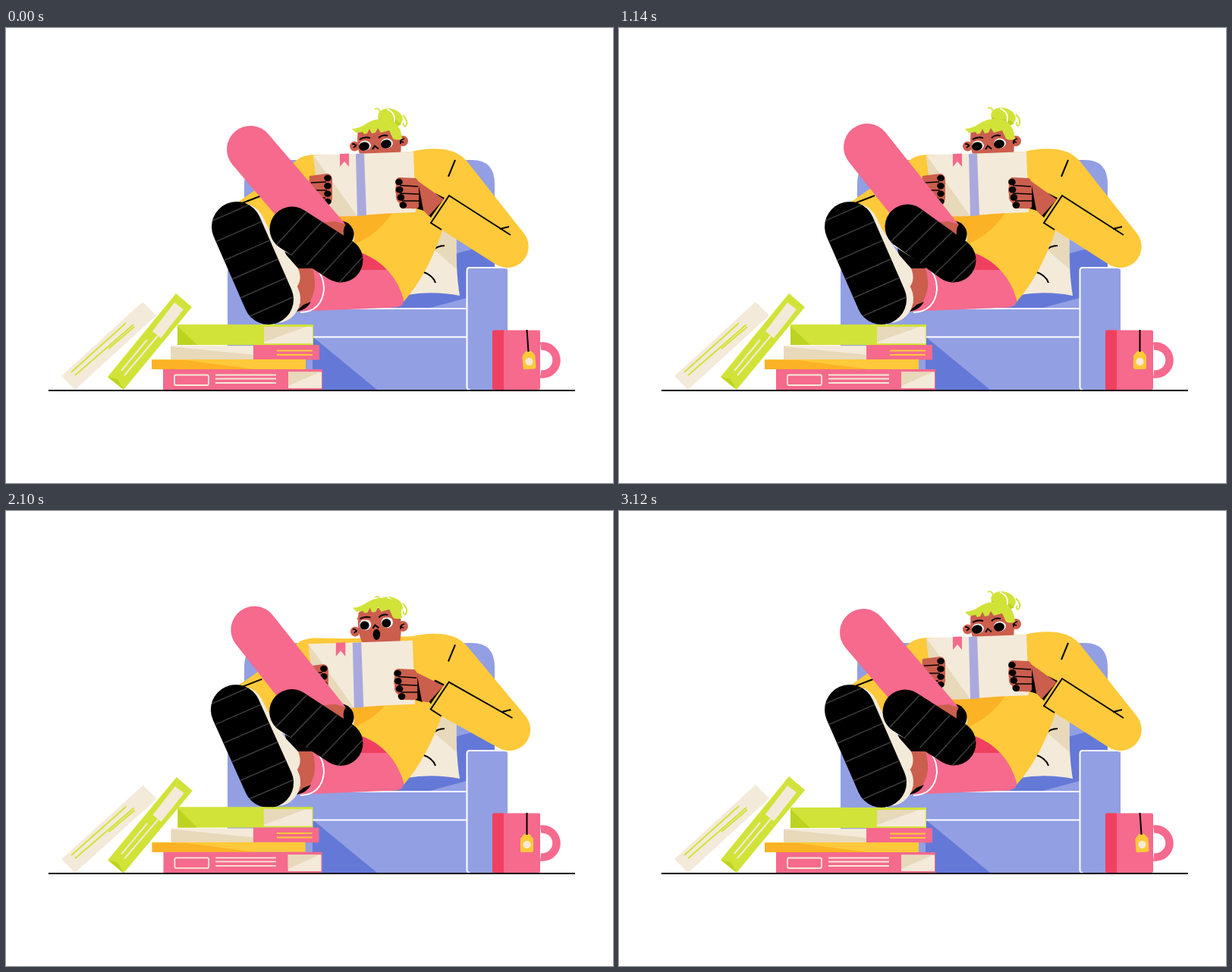
These frames come from a looping animation (800x600 px, 3.15 s). An HTML page with a canvas:

```html
<!DOCTYPE html>
<html lang="en">
<head>
<meta charset="utf-8">
<title>Reading in the armchair</title>
<style>
html, body { margin: 0; width: 100%; height: 100%; overflow: hidden; background: #fff; }
canvas { display: block; }
</style>
</head>
<body>
<canvas id="stage" width="800" height="600"></canvas>
<script>
const c = document.getElementById('stage').getContext('2d');
const LOOP = 3150;
const blue = '#929fe3', navy = '#6479d7', cream = '#f4ead9', sand = '#e8d9bb', pink = '#f56a8d', red = '#f0405f',
  yellow = '#fec93a', orange = '#fcb225', lime = '#d1e339', moss = '#bcd41f', skin = '#cb5e4d', black = '#000', white = '#fff';

function ramp(t, a, b) {
  const u = Math.min(1, Math.max(0, (t - a) / (b - a)));
  return u * u * (3 - 2 * u);
}
const pulse = (t, a, b) => t > a && t < b ? Math.sin(Math.PI * (t - a) / (b - a)) : 0;

// Five moods drive the whole pose: settling in, legs up, frowning, landing, astonishment.
function poseAt(t) {
  const up = ramp(t, 1140, 1620), down = ramp(t, 1620, 1890), calm = ramp(t, 1890, 2160), back = ramp(t, 2700, 3120);
  const lean = ramp(t, 0, 450) - back, kick = up - .75 * down - .25 * calm, frown = up - .25 * down - .75 * calm,
    thud = down - calm, gasp = calm - back;
  return {
    kick, frown, thud, gasp,
    kneeX: 322 + 5 * lean + 11 * kick, kneeY: 160 - 3 * lean - 13 * kick,
    toeX: 304 + 12 * kick + 2 * thud - 2 * gasp, toeY: 262 - 18 * kick + 5 * thud,
    heelX: 346 + frown, heelY: 358 - 11 * kick + 5 * thud,
    tipX: 377 + 3 * lean + 6 * frown + 4 * thud - 5 * gasp, tipY: 265 - 3 * lean - 15 * kick - 4 * thud + 4 * gasp,
    endY: 306 - 4 * kick + 4 * thud,
    bun: 9 * gasp - lean - 3 * kick,
    bookX: 537 - 3 * frown - gasp, bookY: 163 + 5 * thud + 8 * gasp,
    rightX: kick - thud - 2 * gasp, rightY: 5 * thud - 4 * kick + 12 * gasp,
    leftX: 8 * kick - thud - 6 * gasp, leftY: 4 * thud - 5 * kick + 11 * gasp,
    cuffX: -4 * kick - thud, cuffY: 2 * thud - 4 * kick + 5 * gasp,
    elbow: 3 * gasp - 5 * kick, shoulder: 3 * gasp - 3 * frown,
    armX: 18 * kick, armY: gasp - 5 * kick - thud,
    tag: 4 * (lean - 1)
  };
}

function fill(color, d) {
  c.fillStyle = color;
  c.fill(new Path2D(d));
}
function line(color, width, d) {
  c.strokeStyle = color;
  c.lineWidth = width;
  c.stroke(new Path2D(d));
}
function oval(color, x, y, rx, ry = rx, turn = 0) {
  c.fillStyle = color;
  c.beginPath();
  c.ellipse(x, y, rx, ry, turn, 0, 7);
  c.fill();
}
function group(x, y, draw) {
  c.save();
  c.translate(x, y);
  draw();
  c.restore();
}
// Scale and turn around a fixed point.
function around(x, y, sx, sy, deg, draw) {
  group(x, y, () => {
    c.rotate(deg * Math.PI / 180);
    c.scale(sx, sy);
    c.translate(-x, -y);
    draw();
  });
}
function capsule(color, x1, y1, x2, y2, r) {
  const a = Math.atan2(y2 - y1, x2 - x1), q = Math.PI / 2;
  c.fillStyle = color;
  c.beginPath();
  c.arc(x1, y1, r, a + q, a - q);
  c.arc(x2, y2, r, a - q, a + q);
  c.closePath();
  c.fill();
  return a;
}
function sole(x1, y1, x2, y2, r, first, gap, skew) {
  c.save();
  const a = capsule(black, x1, y1, x2, y2, r);
  c.clip();
  c.translate(x1, y1);
  c.rotate(a);
  for (let x = first; x < 150; x += gap) line('#3a3a3a', 1.6, `M${x - skew} 45L${x + skew} -45`);
  c.restore();
}

function sofa() {
  fill(blue, 'M314 320V206Q314 174 344 174H614Q644 174 644 206V320z');
  fill(blue, 'M296 317H610V477H292V321q0-4 4-4z');
  fill(navy, 'M510 320L617 291L644 300V318H607V356L555 370H500z');
  fill(navy, 'M404 407L489 477H404z');
  line(white, 2, 'M352.500 394V374q0-4 4-4H607M403 407.500H607');
  fill(cream, 'M528 352Q562 346 598 353Q592 318 594 262H555z');
  fill(sand, 'M572 266L593.500 266V318L564 292z');
  line(black, 2, 'M562 294Q568 287 578 287M548 321Q563 326 566 336');
  fill(blue, 'M607 477V320q0-4 4-4H657q4 0 4 4V477z');
  line(white, 2, 'M660 317Q659 316 657 316H611q-3.500 0-3.500 4V473q0 4 4 4');
}

function body(p) {
  const s = p.shoulder, x = p.armX, y = p.armY;
  fill(yellow, `M${298 + x} 250V${235 + y}L${325 + x} ${216 + y}L${376 + x} ${181 + y}Q${387 + x} ${167 + y} ${407 + x} ${167 + y}
    L450 ${167 + s / 2}L535 ${163 + s}Q575 ${153 + s} 601 ${170 + s}L596 240L577 262Q556 325 524 361L470 298L420 300z`);
  line(black, 2, `M${311 + x * 1.5} ${231 + y}L${337 + x} ${221 + y}`);
  fill(orange, 'M430 230L516 232Q495 272 456 286z');
}

function sleeve(p) {
  const s = p.shoulder, e = p.elbow, x = p.cuffX, y = p.cuffY;
  const cuff = `${574 + x} ${266 + y}L${560 + x} ${257 + y}L${584 + x} ${221 + y}`;
  fill(yellow, `M560 ${160 + s}Q590 ${157 + s} 607 ${175 + s}L${682 + e} 270A28 28 0 0 1 ${646 + e} 312L${cuff}z`);
  fill(black, `M${578 + x} ${224 + y}L${560 + x} ${250 + y}L${550 + x} 240L${566 + x} ${218 + y}z`);
  group(p.rightX, p.rightY, () => fill(black, 'M541 202L552 210L551 241L541 238z'));
  fill(skin, `M${543 + p.rightX} ${202 + p.rightY}L${577 + x} ${226 + y}L${557 + x} ${248 + y}L${550 + p.rightX} ${240 + p.rightY}z`);
  line(black, 2, `M${cuff}L${665 + e} 273M${651 + e} 265L${663 + e} 262M592 ${174 + s}L583 ${196 + s}`);
}

// side is 1 for the left eye, -1 for the right.
function eye(x, y, side, p) {
  oval(white, x + 1, y - 1, 7.8, 6.5 + p.gasp);
  oval(black, x, y, 7 - p.gasp, 5.6, -.15);
  const lid = y - 8 + 3 * p.frown;
  if (p.frown > .02) fill(skin, `M${x - 10 * side} ${y - 10}V${lid}L${x + 10 * side} ${lid + 9 * p.frown}V${y - 10}z`);
}

function head(p) {
  const ears = 4 * p.frown + 3 * p.gasp;
  around(523, 150, 1 + .16 * p.frown - .03 * p.gasp, 1, 0, () => {
    group(0, p.bun, () => {
      oval(lime, 506.5, 118, 16.5, 11.5, .25);
      fill(moss, 'M491 118Q500 123 513 121L521 127L513 131L492 124z');
      line(white, 1.8, 'M502 107Q515 112 511 126');
      line(lime, 1.8, 'M486 107Q491 104 493 111M523 115Q532 124 526 130Q523 129 524 125');
    });
    group(0, ears, () => {
      oval(skin, 459.5, 156, 6.5);
      oval(skin, 523, 149, 7);
    });
    fill(skin, 'M464 134L474 128H510L519 136Q523 152 518 182H474Q460 163 464 134z');
    group(0, ears, () => line(black, 1.7, 'M456 153Q461 152 461 157M462 154L458 158M525 146Q519 147 520 153M519 149L524 151'));
    group(0, 4 * p.kick - 6 * p.gasp, () => {
      eye(472, 156, 1, p);
      eye(501, 153, -1, p);
      const b = 6 * p.frown;
      line(black, 2, `M466 ${147 + b / 3}Q472 ${143 + b * .8} 480 ${145 + b}M491 ${145 + b}Q496 ${140 + b * .8} 503 ${142 + b / 3}`);
      line(black, 2, 'M483 160L486 155.500L491 159.500');
      const open = .2 + .4 * p.thud + .8 * p.gasp;
      oval(black, 488, 168, 3.500 + 1.500 * p.gasp, 7.5 * open);
    });
    group(0, -6 * p.gasp, () => fill(lime, `M456 133L461 138Q466 138 470 137L472 140L476 139L479 133L482 139L487 138L490 132L494 138
      L505 135L510 146Q516 149 522 146Q521 132 512 124C503 118 487 118 475 126Q467 132 456 133z`));
  });
}

function book(p) {
  group(p.bookX, p.bookY, () => {
    c.scale(1 - .11 * p.kick + .05 * p.gasp, 1 - .09 * p.kick + .06 * p.gasp);
    fill(cream, 'M-132 4.500L-66 2.500L0 0L3 80Q-35 81 -68 84L-122 86z');
    fill(sand, 'M-132 4.500L-74 85L-122 86z');
    fill('#aaa9dd', 'M-76 3L-65 2.500L-62 84L-74 85z');
    const r = -5 * p.kick;
    fill(pink, `M-97 3L-85 2.500L${-85 + r} 20L${-91 + r} 13L${-97 + r} 20z`);
  });
}

function hands(p) {
  group(p.leftX, p.leftY, () => {
    fill(skin, 'M400 195L424 192Q430 194 430 200V224Q430 230 424 232H410L398 226z');
    line(black, 1.6, 'M402 204L422 203M402 214H423M406 224H421');
    for (let i = 0; i < 4; i++) oval(black, 424, 198 + 10.3 * i, 4.8, 4.2);
  });
  group(p.rightX, p.rightY, () => {
    fill(skin, 'M518 197L540 198Q546 202 544 212V236Q542 239 534 238H522Q518 235 518 230Q513 228 514 219Q512 214 514 208Q511 199 518 197z');
    line(black, 1.6, 'M519 207.500L543 209M519 218L544 219M522 228H544');
    for (let i = 0; i < 4; i++) oval(black, 518 + .6 * i * i, 203 + 10.2 * i, 4.8, 4.3);
  });
}

function legs(p) {
  const k = p.kick;
  group(0, -3 * k, () => {
    fill(pink, 'M380 374L513 368.500Q525 367 524 358Q512 315 470 297L400 290L375 330z');
    fill(red, 'M466 296L440 319H502Q489 304 466 296z');
    fill(black, 'M362 262L372 318H404L402 300L385 275z');
    fill(skin, 'M380 317H404Q409 335 406 347Q401 368 385 373L372 355z');
    fill(black, 'M383 373L392 365L402 361Q396 372 383 374z');
  });

  capsule(cream, p.toeX + 6, p.toeY + 1, p.heelX + 10, p.heelY - 1, 32);
  fill(cream, `M${p.toeX + 34} ${p.toeY - 10}L${p.toeX + 66} ${p.toeY + 38}L${p.heelX + 39} ${p.heelY - 41}
    Q${p.heelX + 46} ${p.heelY - 24} ${p.heelX + 34} ${p.heelY - 13}L${p.heelX + 42} ${p.heelY + 5}L${p.heelX + 10} ${p.heelY}z`);
  line(white, 2, `M${p.tipX - 18} ${p.tipY + 24}L402 312Q419 322 419 345Q416 374 388 ${375 - 3 * k}`);
  sole(p.toeX, p.toeY, p.heelX, p.heelY, 33, -20, 27, 5 * p.frown);

  // The ankle end slides up a little as the knee rises.
  const ax = 423 - 3 * k, ay = 278 - 14 * k, a = Math.atan2(ay - p.kneeY, ax - p.kneeX), x = 31 * Math.sin(a), y = -31 * Math.cos(a);
  oval(cream, 445, 276 - 6 * k, 14);
  oval(black, 441, 272 - 6 * k, 17.5);
  fill(pink, `M${p.kneeX - x} ${p.kneeY - y}A31 31 0 0 1 ${p.kneeX + x} ${p.kneeY + y}L${ax + x} ${ay + y}L${ax - x} ${ay - y}z`);
  group(-k, -10 * k, () => fill(skin, 'M412 257L434 255L448 259Q442 266 447 282L425 278z'));
  sole(p.tipX, p.tipY, 441, p.endY, 29.5, -1, 24, 8 + 8 * p.frown);
}

function stack() {
  fill(lime, 'M226 391H405V418H226z');
  fill(moss, 'M226 393L252 418H226z');
  fill(cream, 'M340 394H404V416H340z');
  fill(sand, 'M340 394H396L340 414z');
  fill(cream, 'M217 419H327V437H217z');
  fill(sand, 'M217 420L327 431V437H217z');
  fill(pink, 'M326 418H413V437.500H326z');
  line(yellow, 2, 'M357 425.500H404M357 431H404');
  fill(yellow, 'M192 437H395V450H192z');
  fill(orange, 'M192 438H236L328 450H192z');
  fill(pink, 'M207 450H417V477H207z');
  fill(cream, 'M372 453.500H416V475H372z');
  fill(sand, 'M372 453.500H414L372 472z');
  line(cream, 1.8, 'M224 457.500H265q2 0 2 2V469q0 2-2 2H224q-2 0-2-2V459.500q0-2 2-2zM276 457.500H356M276 462.500H356M276 468H356');
}

function leaning() {
  fill(cream, 'M73 459L180 361L198 379L91 477z');
  line(lime, 2, 'M86 454L158 389M91 458L168 391M135 423L169 394');
  fill(lime, 'M134 460L224 350L245 368L155 477z');
  fill(moss, 'M134 460L147 463L155 477z');
  line(cream, 2, 'M152 452L186 411M156 458L200 406');
  fill(cream, 'M193 400L222 362L234 371L204 409z');
}

function mug(p, t) {
  const jump = pulse(t, 2190, 2550), hop = pulse(t, 2550, 2780);
  group(0, -5.5 * jump - 2 * hop, () => {
    around(673, 438, 1, 1, -.7 * jump + .5 * hop, () => {
      c.strokeStyle = pink;
      c.lineWidth = 10.5;
      c.beginPath();
      c.arc(707, 438, 18.5, -1.7, 1.7);
      c.stroke();
      fill(pink, 'M643 398.500H702q2 0 2 2V475q0 2-2 2H643z');
      fill(red, 'M643 398.500H656V477H643q-2 0-2-2V400.500q0-2 2-2z');
    });
    around(686.5, 398, 1, 1, p.tag, () => {
      fill(yellow, 'M683 426H690L695 432V448q0 2-2 2H680q-2 0-2-2V432z');
      oval(cream, 686.5, 440, 5);
      line(black, 2, 'M686.500 398V427');
    });
  });
}

function frame(now) {
  const t = now % LOOP, p = poseAt(t);
  c.fillStyle = white;
  c.fillRect(0, 0, 800, 600);
  sofa();
  body(p);
  head(p);
  book(p);
  sleeve(p);
  hands(p);
  legs(p);
  const jolt = pulse(t, 1770, 2010) - .4 * pulse(t, 2010, 2230);
  around(310, 477, 1 + .012 * jolt, 1 - .022 * jolt, 0, stack);
  around(91, 477, 1, 1, -jolt, leaning);
  mug(p, t);
  line(black, 2, 'M56 478H750');
  requestAnimationFrame(frame);
}
requestAnimationFrame(frame);
</script>
</body>
</html>
```
